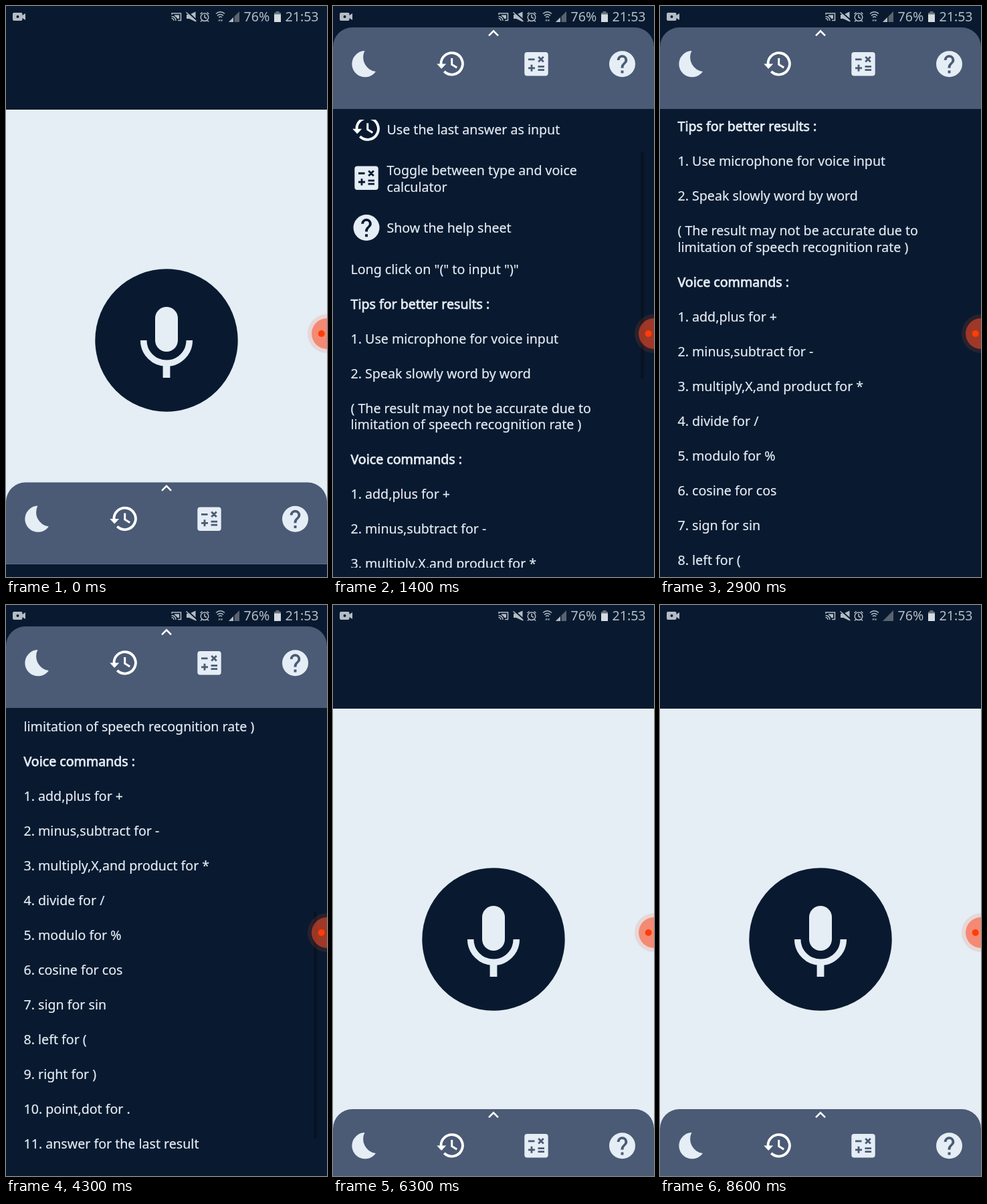
Animation of 480x854 px, one loop 8.7 s. Source, as an HTML page:

```html
<!DOCTYPE html>
<html lang="en">
<head>
<meta charset="utf-8">
<title>Voice calculator help sheet</title>
<style>
  html, body { margin: 0; width: 100%; height: 100%; overflow: hidden; background: #091a30; }
  svg { display: block; }
  text { font-family: "Noto Sans", "Open Sans", sans-serif; font-size: 19.6px; fill: #e5edf5; }
  #list text { stroke: #e5edf5; stroke-width: .2; }
  #list .heading { stroke-width: .75; }
  .status text { fill: #b3bcc5; }
</style>
</head>
<body>
<svg id="stage" width="100%" height="100%" viewBox="0 0 480 854">
  <defs>
    <g id="moon"><path fill="#e5edf5" d="M1-19.5A19.6 19.6 0 1 0 17.5 11.5A21.500 21.500 0 0 1 1-19.5Z"/></g>
    <g id="history" fill="none" stroke="#fff">
      <path stroke-width="3.9" d="M-16.2 1A16.2 16.2 0 1 1-11.4 11.4"/>
      <path stroke="none" fill="#fff" d="M-22.5 0H-8.5L-15.5 7.6Z"/>
      <path stroke-width="3" d="M0-8.5V1L7.5 5.6"/>
    </g>
    <g id="calc">
      <rect x="-17.7" y="-17.7" width="35.4" height="35.4" rx="4" fill="#e5edf5"/>
      <path fill="none" stroke="currentColor" stroke-width="2.8"
        d="M-12-7H-2.5M3.2-10.7L10.8-3.2M10.8-10.7L3.2-3.2M-12 6H-2M-7 1V11M2.5 3.8H12M2.5 8.8H12"/>
    </g>
    <g id="help">
      <circle r="19.5" fill="#e5edf5"/>
      <path fill="currentColor" transform="scale(1.95) translate(-12 -12)"
        d="M13 19h-2v-2h2zM15.07 11.25l-.9.92C13.45 12.9 13 13.5 13 15h-2v-.5c0-1.1.45-2.1 1.17-2.83l1.24-1.26c.37-.36.59-.86.59-1.41a2 2 0 0 0-4 0H8a4 4 0 0 1 8 0c0 .88-.36 1.68-.93 2.25z"/>
    </g>
  </defs>

  <rect width="480" height="854" fill="#091a30"/>
  <rect y="155" width="480" height="699" fill="#e5edf5"/>

  <!-- microphone button -->
  <g transform="translate(240 500)" fill="#e5edf5">
    <circle r="106.7" fill="#091a30"/>
    <rect x="-17" y="-50" width="34" height="67" rx="17"/>
    <path fill="none" stroke="#e5edf5" stroke-width="9.5" d="M-34.3 0A34.3 34.3 0 0 0 34.3 0"/>
    <rect x="-5.4" y="35" width="10.8" height="21"/>
  </g>

  <!-- sliding sheet -->
  <g id="sheet">
    <rect y="122" width="480" height="900" fill="#091a30"/>
    <path fill="#4b5a75" d="M0 122V29A29 29 0 0 1 29 0H451A29 29 0 0 1 480 29V122Z"/>
    <path fill="none" stroke="#fff" stroke-width="2.6" d="M233 12.3L240 5.3L247 12.3"/>
    <g color="#4b5a75">
      <use href="#moon" x="46.4" y="54.6"/>
      <use href="#history" x="177.7" y="54.5"/>
      <use href="#calc" x="304" y="54.8"/>
      <use href="#help" x="432.5" y="54.8"/>
    </g>
    <svg y="138" width="480" height="670" overflow="hidden">
      <g id="list" color="#091a30">
        <use href="#moon" x="49" y="171.8"/>
        <use href="#history" x="51.7" y="242.5"/>
        <use href="#calc" x="50" y="316"/>
        <use href="#help" x="50" y="390.3"/>
      </g>
      <rect id="bar" x="460" width="5" height="339" fill="#000"/>
    </svg>
  </g>

  <!-- status bar -->
  <g class="status" fill="#b3bcc5">
    <path d="M12 10H22.5Q24.5 10 24.5 12V14L29 11V21L24.5 18V20Q24.5 22 22.5 22H12Q10 22 10 20V12Q10 10 12 10Z"/>
    <circle cx="17.5" cy="16" r="2" fill="#091a30"/>
    <path d="M252 13.5H259V19H256Q255 16 252 15Z"/>
    <path d="M270 13H274L283.5 8.5V23.5L274 19H270Z"/>
    <path d="M271 8.500L286 22" stroke="#091a30" stroke-width="2"/>
    <g fill="none" stroke="#b3bcc5" stroke-width="1.5">
      <path d="M248 13V11H261.5V21.5H257M247.5 15.5A6.5 6.5 0 0 1 254 22M247.5 18.5A3.5 3.5 0 0 1 251 22"/>
      <circle cx="297" cy="16.8" r="5.8"/>
      <path d="M297 13V17L300 18.5M290.5 12L293.5 9.5M303.5 12L300.5 9.5M293 21.5L291 23.5M301 21.5L303 23.5"/>
      <path d="M314 11.5Q320.5 6 327 11.5M316 14.5Q320.5 10.5 325 14.5M318 17Q320.5 15 323 17"/>
      <path d="M269.5 9.5L284.5 23"/>
    </g>
    <path d="M317 22.5L319 19.5L321 22.5ZM320.5 20.5H324.5L322.5 23.5Z" opacity=".75"/>
    <path d="M333 24L349 8V24Z" fill="#59636f"/>
    <g id="signal">
      <path d="M333 24L340 17V24Z"/>
      <path d="M340 24V17L341.5 15.5V24Z" fill="#091a30"/>
    </g>
    <path d="M403.5 8H408.5V10H411V24H401V10H403.5Z" fill="#66717d"/>
    <rect x="401" y="12.5" width="10" height="11.5" fill="#d5dbe1"/>
    <text x="355.5" y="23.3">76%</text>
    <text x="417.5" y="23.3">21:53</text>
  </g>

  <!-- floating record button -->
  <circle cx="480" cy="490" r="29" fill="#f0501e" opacity=".14"/>
  <circle cx="480" cy="490" r="23" fill="#ff4c24" opacity=".55"/>
  <circle cx="471.7" cy="490" r="5" fill="#ff3d08"/>
</svg>
<script>
const LOOP = 8700, STEP = 100;
const LIST_TOP = 138, TOP = 32, REST = 754;
const byId = id => document.getElementById(id);
const sheet = byId('sheet'), list = byId('list'), bar = byId('bar'), signal = byId('signal');

function addLine(text, x, y, heading) {
  const line = document.createElementNS('http://www.w3.org/2000/svg', 'text');
  line.setAttribute('x', x);
  line.setAttribute('y', y);
  if (heading) line.setAttribute('class', 'heading');
  line.textContent = text;
  list.append(line);
}

[['Toggle between light and dark theme.', 179.7],
 ['Use the last answer as input', 250.5],
 ['Toggle between type and voice', 312],
 ['calculator', 336.5],
 ['Show the help sheet', 397.8]].forEach(([text, y]) => addLine(text, 80.5, y));

const paragraphs = [
  'Long click on "(" to input ")"',
  'Tips for better results :',
  '1. Use microphone for voice input',
  '2. Speak slowly word by word',
  '( The result may not be accurate due to|limitation of speech recognition rate )',
  'Voice commands :',
  '1. add,plus for +',
  '2. minus,subtract for -',
  '3. multiply,X,and product for *',
  '4. divide for /',
  '5. modulo for %',
  '6. cosine for cos',
  '7. sign for sin',
  '8. left for (',
  '9. right for )',
  '10. point,dot for .',
  '11. answer for the last result'
];
let baseline = 459.5;
for (const paragraph of paragraphs) {
  paragraph.split('|').forEach((text, i) => {
    if (i) baseline += 24.7;
    addLine(text, 26.5, baseline, /^[TV].* :$/.test(text));
  });
  baseline += 52;
}

// Each move: start, end, from, to, ease-out power
const sheetMoves = [[0, 900, 712.5, TOP, 3], [5400, 6300, TOP, REST, 2.4]];
const scrollMoves = [[1300, 2100, 0, 356.5, 2.2], [3600, 4200, 356.5, 535.5, 2.2], [4500, 5100, 535.5, 0, 2.2]];
const clamp = v => Math.min(1, Math.max(0, v));

function valueAt(moves, t) {
  const [start, end, from, to, power] = moves.filter(m => t >= m[0]).pop() || moves[0];
  return to + (from - to) * (1 - clamp((t - start) / (end - start))) ** power;
}

function draw(t) {
  const scroll = valueAt(scrollMoves, t);
  sheet.setAttribute('transform', `translate(0 ${valueAt(sheetMoves, t)})`);
  list.setAttribute('transform', `translate(0 ${-LIST_TOP - scroll})`);
  const shown = Math.max(...scrollMoves.map(([start, end]) =>
    t < start ? 0 : clamp((end + 400 - t) / 200)));
  bar.setAttribute('y', scroll * .54);
  bar.setAttribute('opacity', shown * .28);
  signal.setAttribute('opacity', t < 8400 ? 1 : 0);
}

const origin = performance.now();
function tick() {
  const t = (performance.now() - origin) % LOOP;
  draw(Math.floor(t / STEP) * STEP);
  requestAnimationFrame(tick);
}
tick();
</script>
</body>
</html>
```
